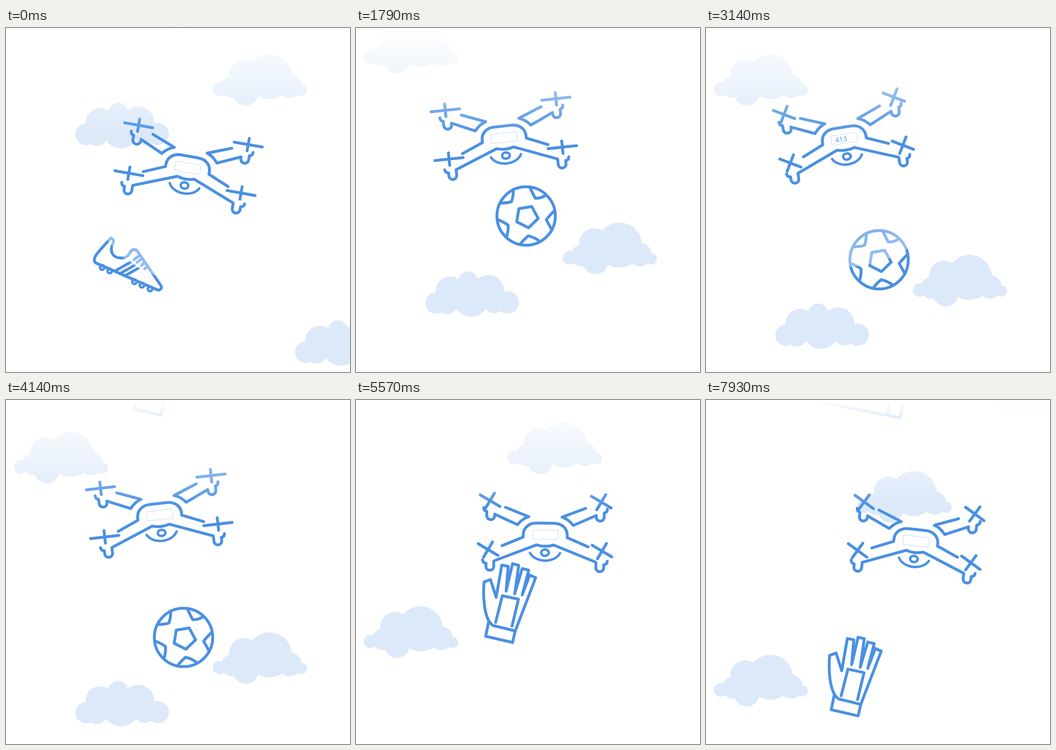
An HTML page for the animation above (8 s loop, 640 by 640 pixels).

```html
<!DOCTYPE html>
<html lang="en">
<head>
<meta charset="utf-8">
<title>Drone scanning sports gear</title>
<style>
  html, body { margin: 0; height: 100%; overflow: hidden; background: #fff; }
  svg { display: block; width: 100vw; height: 100vh; }
  .line { fill: none; stroke: #4a90e2; stroke-width: 5.3; stroke-linecap: round; stroke-linejoin: round; }
  .thin { stroke-width: 4.5; }
  .cloud { fill: #dce9f9; }
  text { font: 13px "Open Sans", "Noto Sans", sans-serif; fill: #4a90e2; }
</style>
</head>
<body>
<svg viewBox="0 0 640 640">
  <defs>
    <linearGradient id="haze" gradientUnits="userSpaceOnUse" x1="0" y1="0" x2="0" y2="200">
      <stop offset="0" stop-color="#fff"/>
      <stop offset="1" stop-color="#fff" stop-opacity="0"/>
    </linearGradient>
    <radialGradient id="glow" gradientUnits="userSpaceOnUse" cx="0" cy="0" r="205">
      <stop offset="0" stop-color="#fff" stop-opacity="0"/>
      <stop offset="1" stop-color="#fff" stop-opacity=".43"/>
    </radialGradient>
    <g id="wide">
      <circle cx="397" cy="114" r="12.5"/><circle cx="420" cy="110" r="20"/>
      <circle cx="443" cy="87" r="28"/><circle cx="490" cy="90.5" r="42"/>
      <circle cx="446" cy="121" r="23.5"/><circle cx="528" cy="108" r="22"/>
      <circle cx="549.5" cy="116" r="10.5"/>
    </g>
    <g id="puffy">
      <circle cx="149" cy="198" r="20"/><circle cx="169" cy="199" r="20"/>
      <circle cx="175" cy="176" r="27"/><circle cx="208.5" cy="157" r="18"/>
      <circle cx="246" cy="176" r="30"/><circle cx="214" cy="189.5" r="34"/>
      <circle cx="257" cy="197" r="20"/><circle cx="282.5" cy="197" r="20.5"/>
    </g>
    <path id="prop"/>
    <g id="half">
      <path d="M-80 21.5L-41 5V1C-41-13-30-21.5-16-21.5H0"/>
      <path d="M0 21.5Q-8 21.5-16 19L-95 50V61A7.3 7.3 0 0 1-109.5 61V54.5Q-115.5 54-116 48"/>
      <path d="M-74.5-50L-31-33Q-42-30-52-18L-94.5-37V-34A7.4 7.4 0 0 1-109.3-34V-42Q-115-43-115-49"/>
    </g>
  </defs>

  <g id="clouds" class="cloud">
    <use href="#puffy"/>
    <use href="#wide"/>
    <use href="#puffy" x="409" y="405"/>
    <use href="#wide" x="-370" y="-373.5"/>
    <use href="#wide" x="-103" y="-715.5"/>
    <use href="#puffy" x="409" y="-997"/>
  </g>

  <g id="shoe" class="line">
    <path d="M195 391Q200 392 200 397C200 402 196 404 196 411C196 424 206 428 215 428C225 428 229 421 232 416C235 411 242 411 245 416L288 479C291 484 287 489 281 487L167 437C163 434 164 430 166 425C169 419 176 412 195 391Z"/>
    <path d="M203 452L232 435.5M212 457L239 441.5M221 461L246 447M238 431L247 424.5M244 436L252 430M252 442L256 438M258 448L262 445"/>
    <g class="thin">
      <circle cx="179" cy="445.5" r="4.2"/><circle cx="193" cy="452" r="4.2"/>
      <circle cx="239" cy="472" r="4.2"/><circle cx="253" cy="478.5" r="4.2"/>
      <circle cx="268" cy="485.5" r="4.2"/>
    </g>
  </g>

  <g id="ball" class="line"><g transform="translate(316.5 349.5)">
    <circle r="54.3"/>
    <path d="M-13.5-13.5L10.5-17.5L22.5 4.5L4.5 22L-17.5 11Z"/>
    <path d="M-24-49C-23-40-25-34-27-27C-34-24-40-24-48-24"/>
    <path d="M7-53L17-33C25-33 30-34 37-39"/>
    <path d="M52-9C47-4 42 1 37.5 7L48 26"/>
    <path d="M-11 53C-7 47-1 41 4 37C12 39 19 42 25 47"/>
    <path d="M-52 7C-45 10-39 13-33.5 17C-33 25-34 31-36 38"/>
  </g></g>

  <g id="glove" class="line">
    <path d="M288 566L247 556C229 545 228 500 230 475L242 470.5L252.5 503.5L263 443.5L275 446L271 492L283 441L294.5 444L287 497L301 450L313 453L301 499L315 462L326 467L288 566L283 587.5L233 576L238.5 549"/>
    <path d="M251.5 550L264 500.5L294 507L282 557"/>
  </g>

  <path id="shirt" class="line" d="M373-25L361 33L172-5M338 28L344-12"/>

  <path id="beam" fill="url(#glow)"/>

  <g id="drone" class="line">
    <use href="#half"/>
    <use href="#half" transform="scale(-1 1)"/>
    <use href="#prop" x="-106" y="29"/><use href="#prop" x="106" y="29"/>
    <use href="#prop" x="-103.5" y="-62"/><use href="#prop" x="103.5" y="-62"/>
    <ellipse class="thin" cy="33.5" rx="7.2" ry="5.8"/>
    <path class="thin" d="M-28 34C-18 53 18 53 28 34"/>
    <rect x="-24" y="-8.7" width="48" height="17.4" rx="3" style="fill:#fff;stroke:#c8ddf6;stroke-width:1"/>
    <text id="count" x="-17" y="4.8" stroke="none"></text>
  </g>

  <rect width="640" height="200" fill="url(#haze)"/>
</svg>
<script>
const LOOP = 8000;
const COUNT_STEP = 60;
const $ = id => document.getElementById(id);

// time, x, y, tilt
const flight = [
  [0, 338, 260, 10], [1000, 308.5, 241.5, 2.8], [1790, 275.5, 204, -6],
  [3140, 257, 206, -9], [4790, 312.5, 224.5, -3.8], [6570, 396.5, 281, 6.2],
  [7930, 390.5, 262.5, 6.2]
];
// time, x, y
const sway = [
  [0, 0, 13.6], [1000, 1, 0], [1790, -7.5, 5.5], [3140, -2, 9], [4790, 10, 5],
  [6570, 5.5, 10], [7540, 2, 11], [7930, 1, 26]
];
// start, duration, distance
const moves = [[0, 2400, 373.5], [3934, 2150, 391.5], [7540, 2150, 390]];
// ref: the time at which the drawing needs no offset; move: the one that brings it in
const items = [
  { id: 'shoe', ref: 0, move: 0, mid: [226, 440] },
  { id: 'ball', ref: 1790, move: 0, mid: [316.5, 349.5] },
  { id: 'glove', ref: 7930, move: 1, mid: [278, 514] },
  { id: 'shirt', ref: 7930, move: 2 }
];
const scans = [
  { item: 0, open: -1200, close: 258 },
  { item: 1, open: 2500, close: 3800, from: 2600, to: 3560, rate: 413 / 540 },
  { item: 2, open: 6150, close: 7500, from: 6210, to: 7300, rate: 8136 / 360 }
];

const clamp = v => Math.min(1, Math.max(0, v));

// Smooth curve through the rows of a table
function along(rows, t) {
  const last = rows.length - 1;
  let i = 0;
  while (i < last - 1 && t > rows[i + 1][0]) i++;
  const a = rows[i], b = rows[i + 1], span = b[0] - a[0];
  const u = (t - a[0]) / span;
  const p = rows[Math.max(0, i - 1)], n = rows[Math.min(last, i + 2)];
  return a.slice(1).map((_, k) => {
    k++;
    const ma = (b[k] - p[k]) / (b[0] - p[0]) * span;
    const mb = (n[k] - a[k]) / (n[0] - a[0]) * span;
    const d = b[k] - a[k];
    return a[k] + u * (ma + u * (3 * d - 2 * ma - mb + u * (ma + mb - 2 * d)));
  });
}

function scroll(t) {
  return moves.reduce((sum, [start, time, dist]) => {
    const u = clamp((t - start) / time);
    return sum + dist * u * u * (3 - 2 * u);
  }, 0);
}

function itemPlace(t) {
  const [x, y] = along(sway, t);
  return [x, y + 1.3 * scroll(t)];
}

function countText(t, { from, to, rate }) {
  if (!(t > from && t < to)) return '';
  return Math.round(rate * COUNT_STEP * Math.floor((t - from) / COUNT_STEP));
}

function drawBeam(t, cam, places) {
  const scan = scans.find(s => t > s.open && t < s.close);
  $('beam').setAttribute('visibility', scan ? 'visible' : 'hidden');
  $('count').textContent = scan ? countText(t, scan) : '';
  if (!scan) return;
  const r = 205 * clamp(Math.min(t - scan.open, scan.close - t) / 300);
  const { mid } = items[scan.item], [dx, dy] = places[scan.item];
  const aim = Math.atan2(mid[1] + dy - cam[1], mid[0] + dx - cam[0]);
  const spread = Math.PI / 8.2;
  const rim = a => `${r * Math.cos(a)} ${r * Math.sin(a)}`;
  $('beam').setAttribute('d', `M0 0L${rim(aim - spread)}A${r} ${r} 0 0 1 ${rim(aim + spread)}Z`);
  $('beam').setAttribute('transform', `translate(${cam})`);
  $('glow').setAttribute('r', r);
}

function draw(t) {
  $('clouds').setAttribute('transform', `translate(0 ${scroll(t)})`);

  const now = itemPlace(t);
  const places = items.map(({ id, ref, move }) => {
    const base = itemPlace(ref);
    const place = [now[0] - base[0], now[1] - base[1]];
    $(id).setAttribute('transform', `translate(${place})`);
    $(id).setAttribute('visibility', t >= moves[move][0] ? 'visible' : 'hidden');
    return place;
  });

  const [x, y, tilt] = along(flight, t);
  const rad = tilt * Math.PI / 180;
  $('drone').setAttribute('transform', `translate(${x} ${y}) rotate(${tilt})`);
  $('prop').setAttribute('d', t % 216 < 108
    ? 'M-26.5 0H26.5M0-11.7V11.7'
    : 'M-18.4-10.6L18.4 10.6M8.2-14.2L-8.2 14.2');
  drawBeam(t, [x - 33.5 * Math.sin(rad), y + 33.5 * Math.cos(rad)], places);
}

function tick() {
  draw(performance.now() % LOOP);
  requestAnimationFrame(tick);
}
tick();
</script>
</body>
</html>
```
